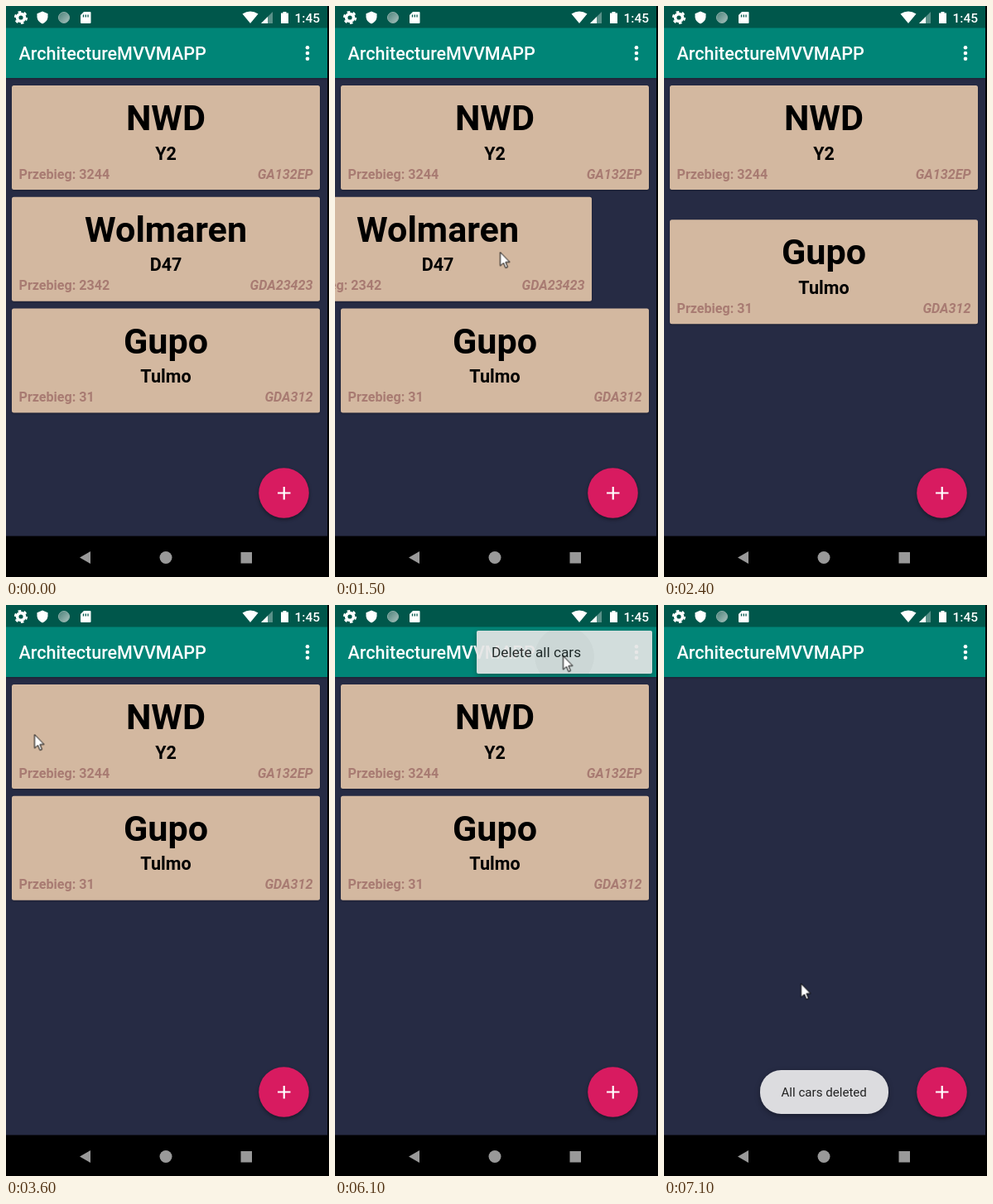
Animation of 390x690 px, one loop 7200 ms. Source, as an HTML page:

```html
<!DOCTYPE html>
<html lang="en">
<head>
<meta charset="utf-8">
<title>Car list</title>
<style>
  html, body { margin: 0; width: 100%; height: 100%; overflow: hidden; background: #000; }
  svg { display: block; width: 390px; height: 690px; font-family: Roboto, sans-serif; }
  .mid { text-anchor: middle; font-weight: 700; }
  .info { font-size: 16.1px; font-weight: 700; fill: #a87b72; }
  .plate { text-anchor: end; font-style: italic; }
  .card rect { fill: #d3b8a0; filter: drop-shadow(0 1px 1px #0004); }
  #menu { transform-origin: 383px 31px; }
  #ripple { transform-origin: 277px 62px; }
  #panel, #toast rect { filter: drop-shadow(0 2px 3px #0005); }
</style>
</head>
<body>
<svg viewBox="0 0 390 690">
  <defs>
    <clipPath id="menuClip"><rect x="171" y="31" width="212" height="52" rx="2"/></clipPath>
    <linearGradient id="spin" x2="1" y2="1">
      <stop stop-color="#4b8179"/><stop offset="1" stop-color="#a9c2be"/>
    </linearGradient>
  </defs>

  <rect width="388" height="641" fill="#262b44"/>
  <g id="cards"></g>

  <!-- app bar -->
  <rect y="26" width="388" height="61" fill="#008577" style="filter:drop-shadow(0 1px 1px #0004)"/>
  <text x="15.5" y="65" font-size="21.56" font-weight="500" fill="#fff">ArchitectureMVVMAPP</text>
  <g fill="#fff">
    <circle cx="364" cy="50.3" r="2.3"/><circle cx="364" cy="57" r="2.3"/><circle cx="364" cy="63.7" r="2.3"/>
  </g>

  <!-- status bar -->
  <rect width="388" height="26.5" fill="#00574b"/>
  <g fill="#fff">
    <circle cx="18" cy="14" r="4.4" fill="none" stroke="#fff" stroke-width="3.6"/>
    <circle cx="18" cy="14" r="7" fill="none" stroke="#fff" stroke-width="2.2" stroke-dasharray="3.67 3.66"/>
    <path d="M44 6.5L50.5 9.3V13.5Q50 19 44 21.5Q38 19 37.5 13.5V9.3Z"/>
    <circle cx="70" cy="14" r="6.5" fill="url(#spin)" stroke="#8fb0aa"/>
    <path d="M94 7H101.500Q102.500 7 102.500 8V20Q102.500 21 101.500 21H91Q90 21 90 20V11Z"/>
    <path d="M93.500 10.500v3M96.300 10.500v3M99 10.500v3" stroke="#00574b" stroke-width="1.3"/>
    <path d="M285.500 9.500Q295 3.500 304.500 9.500L295 21Z"/>
    <path d="M308 21L322 7V21Z" opacity=".35"/>
    <path d="M308 21L316 13V21Z"/>
    <path d="M334.500 7H338.500V8.500H341V21H332V8.500H334.500Z"/>
    <text x="348.500" y="19.700" font-size="15.500" font-weight="500">1:45</text>
  </g>

  <!-- add button -->
  <circle cx="335.5" cy="588.5" r="30.3" fill="#d81b60" style="filter:drop-shadow(0 2px 2px #0006)"/>
  <path d="M328 588.500H343.500M335.750 581V596.500" stroke="#fff" stroke-width="2.2"/>

  <g id="menu">
    <rect id="panel" x="171" y="31" width="212" height="52" rx="2" fill="#f2f2f2"/>
    <g clip-path="url(#menuClip)">
      <g id="press">
        <rect x="171" y="31" width="212" height="52" opacity=".05"/>
        <circle id="ripple" cx="277" cy="62" r="36" opacity=".03"/>
      </g>
    </g>
    <text x="189" y="63.3" font-size="17.25" fill="#212121">Delete all cars</text>
  </g>

  <g id="toast">
    <rect x="116" y="562" width="155" height="53" rx="25.500" fill="#dcdcdf"/>
    <text x="141.5" y="594" font-size="15.1" fill="#222">All cars deleted</text>
  </g>

  <!-- navigation bar and right edge -->
  <path d="M0 640.500H390V690H0ZM388 0H390V690H388Z"/>
  <g fill="#999">
    <path d="M102 659V674L89 666.500Z"/>
    <circle cx="193" cy="666.500" r="7.5"/>
    <rect x="283.500" y="660" width="13.500" height="13.500"/>
  </g>

  <g id="cursor">
    <path d="M0 0V16.500L4 13L6.500 19L9 18L6.500 12H11.500Z" fill="#fff" stroke="#000"/>
  </g>
</svg>
<script>
const LOOP = 7200, STEP = 100, PITCH = 134.75;
const SINE = 'cubic-bezier(.37,0,.63,1)';
const $ = id => document.getElementById(id);

const cars = [
  ['NWD', 'Y2', '3244', 'GA132EP'],
  ['Wolmaren', 'D47', '2342', 'GDA23423'],
  ['Gupo', 'Tulmo', '31', 'GDA312'],
];

$('cards').innerHTML = cars.map(([make, model, miles, plate], i) => `
  <g transform="translate(0 ${96 + i * PITCH})"><g class="card" id="car${i}">
    <rect x="7" width="372" height="126" rx="2.5"/>
    <text class="mid" x="193" y="54.2" font-size="43.1">${make}</text>
    <text class="mid" x="193" y="89.5" font-size="21.56">${model}</text>
    <text class="info" x="15.5" y="112.6">Przebieg: ${miles}</text>
    <text class="info plate" x="370.5" y="112.6">${plate}</text>
  </g></g>`).join('');

// Each track is a list of [ms, value, easing to the next].
const clips = [];
function track(id, prop, keys, show = v => v) {
  const all = [[0, keys[0][1]], ...keys, [LOOP, keys[keys.length - 1][1]]];
  const frames = all.map(([ms, v, easing = 'linear']) =>
    ({ offset: ms / LOOP, [prop]: show(v), easing }));
  const clip = $(id).animate(frames, { duration: LOOP, fill: 'both' });
  clip.pause();
  clips.push(clip);
}
const shift = ([x, y]) => `translate(${x}px, ${y}px)`;
const scale = s => `scale(${s})`;

track('cursor', 'transform', [
  [200, [395, 350]], [900, [282, 299], SINE], [1200, [277, 298]],
  [1500, [199.5, 297.5]], [1900, [54, 300]], [2200, [-20, 302]],
  [2900, [-20, 215]], [3000, [5, 200]], [3600, [34.5, 156.5]],
  [4200, [48, 148]], [4600, [142, 95]], [4900, [255.5, 69.5]],
  [5000, [358, 57]], [5400, [358, 57], SINE], [5900, [275.5, 61.5]],
  [6200, [275.5, 61.5], SINE], [6800, [170, 440]], [7100, [165.5, 457.5]],
], shift);

track('car1', 'transform', [
  [1230, [0, 0]], [1500, [-69, 0]], [1900, [-215, 0]], [2100, [-395, 0]],
], shift);
track('car2', 'transform', [[2225, [0, 0], SINE], [2475, [0, -PITCH]]], shift);
track('cards', 'opacity', [[6200, 1], [6320, 0]]);

track('menu', 'opacity', [[5300, 0], [5500, 1], [6000, 1], [6100, .92], [6200, 0]]);
track('menu', 'transform', [[5300, .5, 'ease-out'], [5600, 1]], scale);
track('press', 'opacity', [[5950, 0], [6050, 1]]);
track('ripple', 'transform', [[6000, .4], [6100, 1], [6200, 1.8]], scale);
track('toast', 'opacity', [[6300, 0], [6600, 1]]);

const start = performance.now();
function draw() {
  const ms = (performance.now() - start) % LOOP;
  const t = Math.floor(ms / STEP) * STEP;
  for (const clip of clips) clip.currentTime = t;
  requestAnimationFrame(draw);
}
draw();
</script>
</body>
</html>
```
